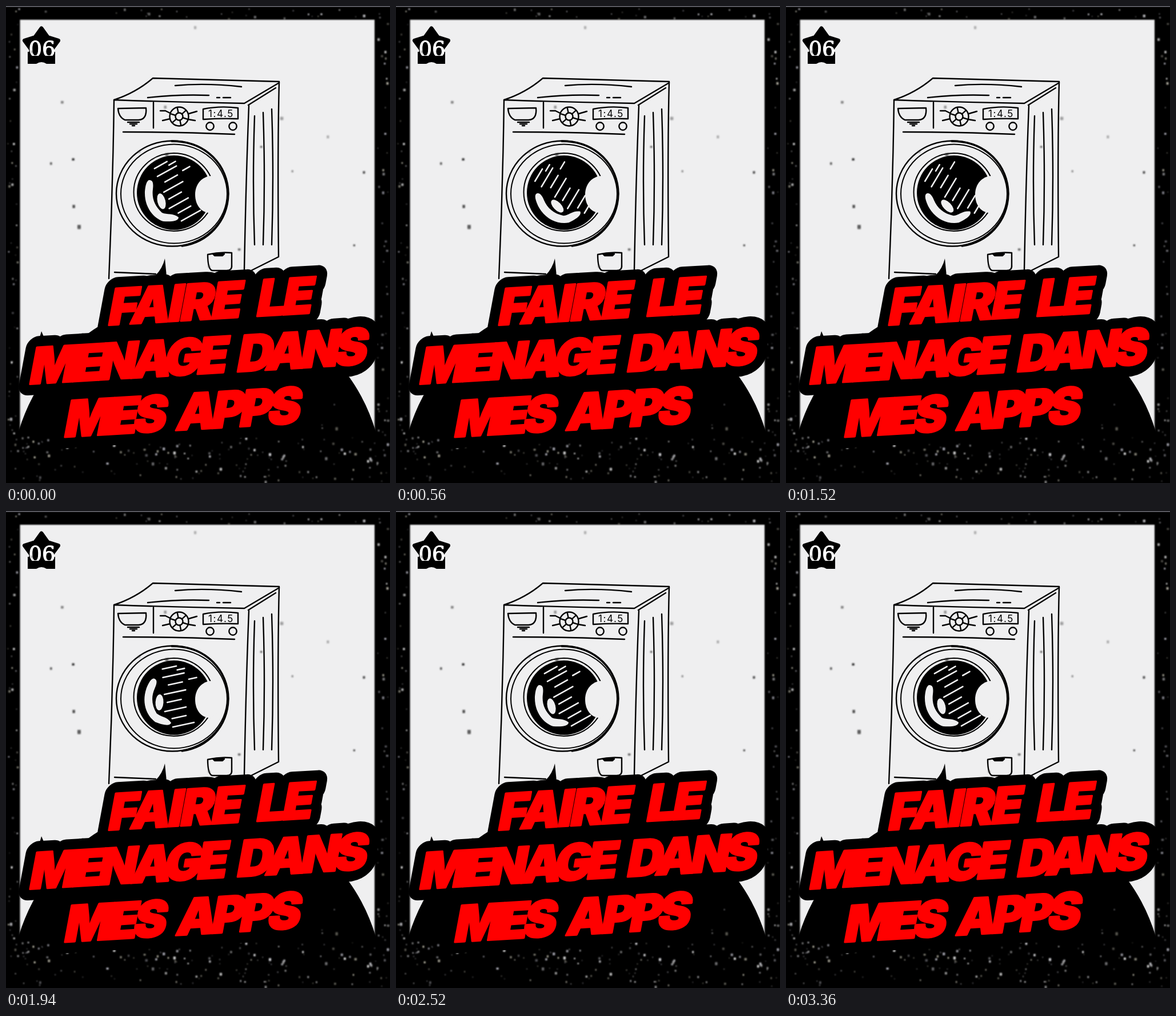
An HTML page that plays this animation: 672 by 833 pixels, repeating every 3.38 s.

```html
<!DOCTYPE html>
<html lang="fr">
<head>
<meta charset="utf-8">
<title>Faire le menage dans mes apps</title>
<style>
  html, body { margin: 0; width: 100%; height: 100%; overflow: hidden; background: #000; }
  svg { display: block; width: 672px; height: 833px; }
  .ink { fill: none; stroke: #000; stroke-width: 2.4; stroke-linecap: round; stroke-linejoin: round; }
  .title { font: 900 87px Inter, sans-serif; word-spacing: 16px; stroke-linejoin: round; }
  .halo .title { fill: #000; stroke: #000; stroke-width: 39; }
  .face .title { fill: #f00; stroke: #f00; stroke-width: 3.4; }
</style>
</head>
<body>
<svg viewBox="0 0 672 833" xmlns="http://www.w3.org/2000/svg">
  <defs>
    <clipPath id="glass"><ellipse cx="294" cy="326" rx="65" ry="65"/></clipPath>
    <clipPath id="badge"><rect x="20" y="30" width="90" height="57"/></clipPath>
    <filter id="soft" x="-20%" y="-20%" width="140%" height="140%"><feGaussianBlur stdDeviation=".8"/></filter>
  </defs>

  <rect width="672" height="833"/>
  <rect width="672" height="1.6" fill="#6b6b74"/>
  <rect x="24.5" y="24" width="620.5" height="760" fill="#efeff0" filter="url(#soft)"/>

  <!-- number badge -->
  <path id="star" stroke="#000" stroke-width="7" stroke-linejoin="round"/>
  <rect x="38" y="80" width="48" height="21"/>
  <path d="M53 101 Q62 95 71 101 Z" fill="#efeff0"/>
  <text x="39.5" y="88" font-family="DejaVu Serif, Noto Serif, serif" font-size="37" fill="#fff" stroke="#fff" clip-path="url(#badge)">06</text>

  <!-- machine body -->
  <g class="ink">
    <path d="M189 164 Q228 151 257 126 Q370 129 478 132 Q475 250 477 438 L417 468"/>
    <path d="M180 476 Q187 320 189 164 Q300 168 417 170 L478 134 M424 173 L472 143"/>
    <path d="M425 174 Q420 300 417 461 M190 465 L262 468"/>
    <path d="M296 139 Q350 134 412 141 M248 160 Q300 154 355 156 M369 160 H374 M380 160 H393"/>
    <path d="M258 168 V213 M205 220 Q300 220 400 224"/>
    <path d="M196 179 L245 178 Q247 198 232 199 H208 Q197 194 196 179 Z"/>
    <circle cx="303" cy="193" r="16.500"/>
    <circle cx="303" cy="193" r="6.500"/>
    <path d="M270 183 H279 L287 187 M274 200 L287 197 M320 188 L334 184 M319 198 L331 200"/>
    <path d="M345 180 Q374 174 406 178 V197 Q375 196 345 198 Z"/>
    <circle cx="357" cy="210" r="6.700"/><circle cx="397" cy="210" r="6.700"/>
    <path d="M353 434 Q374 429 395 431 V452 Q396 462 386 462 H361 Q353 460 353 434 Z"/>
    <path d="M362 433 H382 L379 436 H365 Z" fill="#000"/>
    <path id="details"/>
  </g>
  <text x="354" y="194" font-family="Inter, sans-serif" font-size="17" letter-spacing="1.6">1:4.5</text>

  <!-- door -->
  <g class="ink">
    <ellipse cx="291" cy="327.500" rx="98" ry="92"/>
    <ellipse cx="294" cy="328" rx="93" ry="86.500" stroke-width="2"/>
    <path d="M290 236 C352 236 389 280 389 328 C388 378 352 413 308 419" stroke-width="3.400"/>
    <ellipse cx="293.500" cy="325" rx="70" ry="68" stroke-width="2"/>
  </g>
  <ellipse cx="294" cy="326" rx="65" ry="65"/>
  <g clip-path="url(#glass)">
    <g id="drum" fill="#efeff0">
      <path id="streaks" stroke="#efeff0" stroke-width="2.600" stroke-linecap="round"/>
      <path d="M250 304 C258 303 258 312 257 320 C255 336 260 349 273 361 C282 365 292 361 302 369 C302 376 289 377 275 376 C256 369 242 350 243 324 C244 313 246 306 250 304 Z"/>
      <ellipse cx="272" cy="341" rx="7" ry="14" transform="rotate(-14 272 341)"/>
    </g>
  </g>
  <path d="M364 297 C346 295 331 309 331 329 C331 349 343 362 358 361 C384 350 384 308 364 297 Z" fill="#efeff0"/>

  <g id="dust" filter="url(#soft)"></g>

  <!-- dark dome -->
  <circle cx="334.500" cy="836" r="326"/>
  <rect y="757" width="672" height="76"/>
  <path d="M262 470 Q274 458 278 441 L281 472 Z M58 582 L62 568 L68 582 Z"/>
  <g id="stars" filter="url(#soft)"></g>

  <g class="halo" id="halo"></g>
  <g class="face" id="face"></g>
</svg>
<script>
  const NS = 'http://www.w3.org/2000/svg';
  const $ = id => document.getElementById(id);
  const range = n => [...Array(n).keys()];
  const shape = (id, d) => $(id).setAttribute('d', d);

  function add(parent, tag, attrs, text) {
    const el = document.createElementNS(NS, tag);
    for (const key in attrs) el.setAttribute(key, attrs[key]);
    if (text) el.textContent = text;
    parent.appendChild(el);
  }

  function title(text, x, y, gap) {
    for (const id of ['halo', 'face']) {
      add($(id), 'text', {
        class: 'title', 'letter-spacing': gap,
        transform: `translate(${x} ${y}) rotate(-3.4) skewX(-14)`
      }, text);
    }
  }
  title('FAIRE LE', 176, 557.5, -3.7);
  title('MENAGE DANS', 38, 660.5, -8.1);
  title('MES APPS', 99, 753, -7.8);

  function polar(cx, cy, r, a) {
    return `${cx + r * Math.cos(a)} ${cy + r * Math.sin(a)}`;
  }

  shape('star', 'M' + range(10).map(i =>
    polar(62, 70, i % 2 ? 19 : 31, (i / 5 - .5) * Math.PI)).join('L') + 'Z');

  // knob spokes, drawer vents, side grooves
  const spokes = range(6).map(i => {
    const a = (i + .3) * Math.PI / 3;
    return `M${polar(303, 193, 6.5, a)}L${polar(303, 193, 16, a)}`;
  });
  const vents = range(3).map(i => `M${213 + 4 * i} ${203 + 3 * i}H${233 - 4 * i}`);
  const grooves = range(3).map(i => {
    const x = 435 + 15 * i, bend = i ? 4 : -4;
    return `M${x} ${192 - 6 * i}q${bend} 115 0 ${225 + 6 * i}`;
  });
  shape('details', [...spokes, ...vents, ...grooves].join(''));

  // slanted light streaks, alternately short and long, with two side dashes
  const tilt = -29 * Math.PI / 180;
  function streak(along, across, length) {
    const dx = Math.cos(tilt), dy = Math.sin(tilt);
    const x = 293 + along * dx - across * dy, y = 326 + along * dy + across * dx;
    const h = length / 2;
    return `M${x - h * dx} ${y - h * dy}L${x + h * dx} ${y + h * dy}`;
  }
  const rows = range(8).map(i => streak(4 + 5 * Math.sin(i), -53 + 14.7 * i, i % 2 ? 38 : 25));
  shape('streaks', rows.join('') + streak(23, -46, 13) + streak(40, -26, 14));

  let seed = 61;
  const rnd = () => (seed = seed * 16807 % 2147483647) / 2147483647;

  function scatter(id, count, [x, y, w, h], base, colors) {
    for (const i of range(count)) {
      const size = base + 3 * rnd() ** 2;
      add($(id), 'rect', {
        x: x + w * rnd(), y: y + h * rnd(),
        width: size, height: size * (.8 + .5 * rnd()), rx: 1,
        fill: colors[rnd() * colors.length | 0],
        opacity: .35 + .5 * rnd()
      });
    }
  }
  const pale = ['#fff', '#e4e4ea', '#bcbcc8', '#d6d2c0'];
  scatter('dust', 19, [30, 30, 605, 520], 3.5, ['#222', '#444']);
  scatter('stars', 30, [2, 4, 666, 17], 1.6, pale);
  scatter('stars', 45, [2, 24, 18, 740], 1.6, pale);
  scatter('stars', 45, [648, 24, 20, 740], 1.6, pale);
  scatter('stars', 170, [3, 752, 664, 77], 1.6, pale);
  scatter('stars', 22, [110, 690, 470, 62], 1.6, pale);

  // Pictures come in groups of three: one long, two short.
  const LOOP = 3380, GROUP = 140, LEAD = 20;
  function picture(t) {
    const u = t - LEAD;
    const k = Math.floor(u / GROUP), rest = u - k * GROUP;
    return 1 + 3 * k + (rest >= 100) + (rest >= 120);
  }

  // The drum jumps between three angles, eight pictures each.
  const HOLD = 8, angles = [0, -30, 17];
  function draw(t) {
    const pose = Math.floor((picture(t) + 1) / HOLD) % angles.length;
    $('drum').setAttribute('transform', `rotate(${angles[pose]} 293 326)`);
  }

  const start = performance.now();
  function tick() {
    draw((performance.now() - start) % LOOP);
    requestAnimationFrame(tick);
  }
  draw(0);
  requestAnimationFrame(tick);
</script>
</body>
</html>
```
